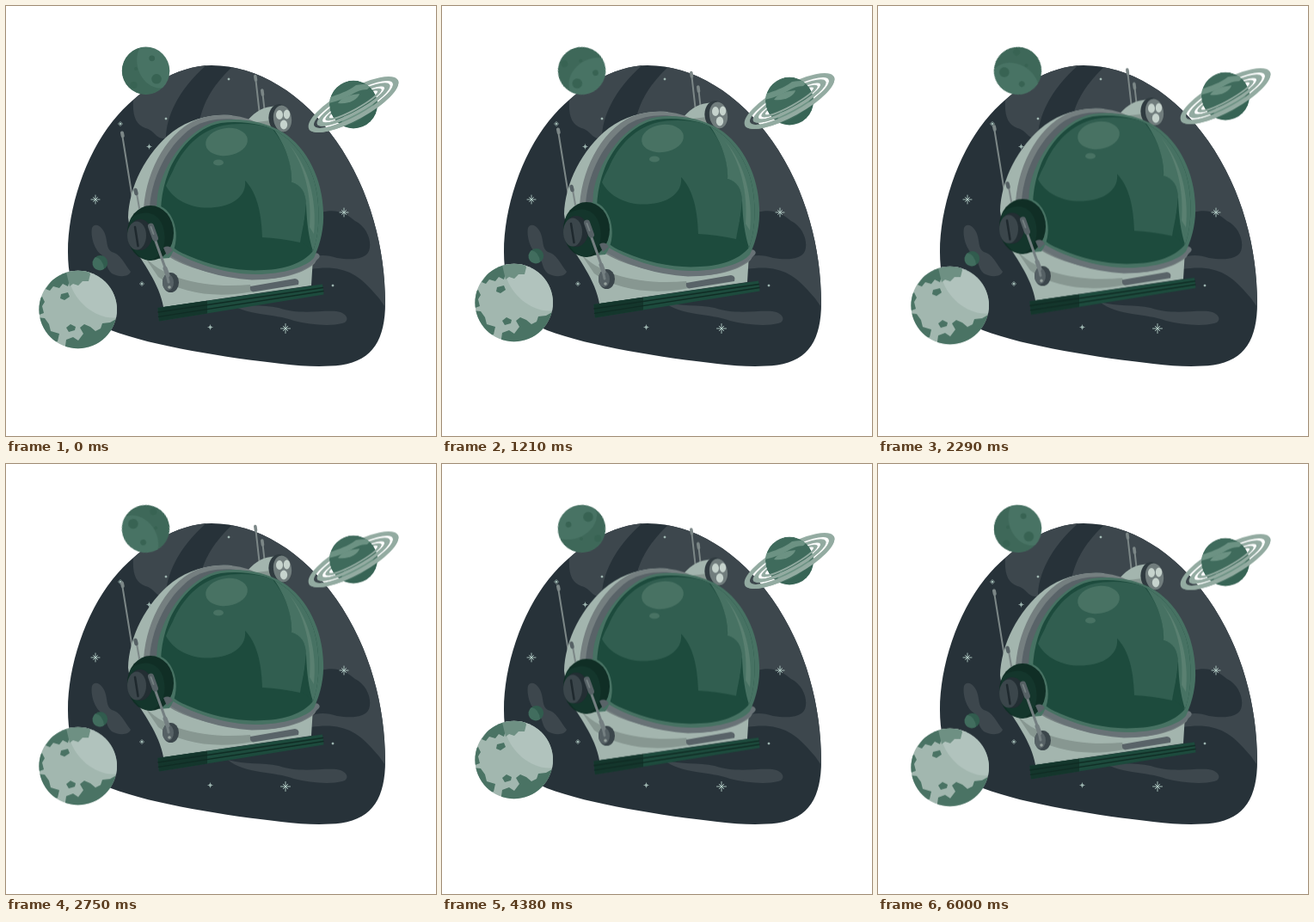
An HTML page that plays this animation: 500 by 500 pixels, repeating every 6040 ms.

```html
<!DOCTYPE html>
<html lang="en">
<head>
<meta charset="utf-8">
<title>Space helmet</title>
<style>
  html, body { margin: 0; width: 100%; height: 100%; overflow: hidden; background: #fff; }
  svg { display: block; width: 100vw; height: 100vh; }
  .float { animation: rise var(--half) linear infinite alternate; }
  .helmet { --half: 3020ms; }
  .globe { --half: 1510ms; }
  .ringed { --half: 755ms; }
  .spin { transform-origin: 162.5px 75.3px; animation: turn 6040ms linear infinite; }
  @keyframes rise { to { transform: translateY(-10px); } }
  @keyframes turn { to { transform: rotate(360deg); } }
  .line { fill: none; stroke-linecap: round; stroke-linejoin: round; }
</style>
</head>
<body>
<svg viewBox="0 0 500 500">
  <defs>
    <clipPath id="skyClip"><path id="sky" d="M239 69C199 69 154 97 124 134C92 174 72 235 72 286C72 334 90 364 122 377C172 396 258 409 320 416C346 419 368 420 390 417.500C427 412 441 387 441 345C441 283 424 214 384 157C346 102 292 69 239 69Z"/></clipPath>
    <clipPath id="globeClip"><circle cx="83.700" cy="353" r="45.300"/></clipPath>
    <clipPath id="moonClip"><circle cx="162.500" cy="75.300" r="27.800"/></clipPath>
    <clipPath id="ballClip"><circle cx="404" cy="114.500" r="28"/></clipPath>
    <clipPath id="visorClip"><path id="visor" d="M250 136C221 141 199 168 189 193C180 216 178 242 182 260C185 277 197 284 211 290C241 303 271 309 300 307C324 306 344 300 357 285C366 262 366 220 355 194C344 166 322 145 298 139C282 135 265 134 250 136Z"/></clipPath>
    <clipPath id="railLeft"><rect x="170" y="320" width="64" height="50"/></clipPath>
    <clipPath id="front"><rect x="-65" y="0" width="130" height="30"/></clipPath>
    <path id="rings" fill-rule="evenodd" d="M-59 0A59 18 0 0 1 59 0A59 18 0 0 1 -59 0ZM-52 0A52 13 0 0 0 52 0A52 13 0 0 0 -52 0ZM-48 0A48 11.500 0 0 1 48 0A48 11.500 0 0 1 -48 0ZM-41 0A41 8 0 0 0 41 0A41 8 0 0 0 -41 0ZM-37 0A37 7 0 0 1 37 0A37 7 0 0 1 -37 0ZM-32 0A32 5 0 0 0 32 0A32 5 0 0 0 -32 0Z"/>
  </defs>

  <!-- sky -->
  <use href="#sky" fill="#273239"/>
  <g clip-path="url(#skyClip)" fill="#3d474d">
    <path d="M148 110C147 128 151 138 162 142C174 145 173 155 186 154C186 128 201 96 236 66L180 70Z"/>
    <path d="M266 68C242 90 230 110 225 134L300 250L366 240C386 235 396 242 406 250C420 257 426 274 422 285C417 296 399 295 385 293C373 289 362 289 355 293L354 306C391 300 409 312 425 330Q435 340 442 352L460 300L430 120Z"/>
    <path d="M100 258C104 250 114 258 116 268C118 276 117 282 123 286C133 288 137 299 145 309C142 316 130 315 123 311C115 304 118 295 111 289C103 284 98 268 100 258Z"/>
    <path d="M258 344C278 350 298 347 317 351C339 359 364 354 384 355C398 357 400 367 391 369C375 373 352 370 335 366C312 357 278 361 258 344Z"/>
  </g>
  <g id="stars" class="line" stroke="#b5cec8"></g>

  <!-- turning moon -->
  <g class="spin">
    <g clip-path="url(#moonClip)">
      <circle cx="162.500" cy="75.300" r="28" fill="#3e6859"/>
      <path d="M158 44C148 58 151 80 166 91Q176 98 187 94L200 70L180 40Z" fill="#487364"/>
      <g fill="#386353">
        <circle cx="175" cy="84.800" r="5.800"/>
        <circle cx="169.700" cy="60.800" r="3.400"/>
        <circle cx="148.500" cy="92" r="4"/>
        <circle cx="151" cy="73" r="2"/>
      </g>
    </g>
  </g>

  <!-- ringed planet -->
  <g class="float ringed">
    <use href="#rings" transform="translate(404 114.500) rotate(-28.800)" fill="#93aba1"/>
    <g clip-path="url(#ballClip)">
      <circle cx="404" cy="114.500" r="28" fill="#3f6b5c"/>
      <g fill="#6c9283">
        <path d="M374 107C386 103 396 100 407 92Q418 90 425 92L420 97C405 97 399 109 374 113Z"/>
        <path d="M386 113C391 105 402 103 411 102C410 108 398 115 386 113Z"/>
        <path d="M393 128C407 126 416 113 434 109L434 115C418 118 412 134 390 136Z"/>
      </g>
      <path d="M432 96C430 120 416 135 392 140L408 148L438 132Z" fill="#315e4f" opacity=".5"/>
    </g>
    <use href="#rings" transform="translate(404 114.500) rotate(-28.800)" fill="#93aba1" clip-path="url(#front)"/>
  </g>

  <!-- helmet -->
  <g class="float helmet">
    <g class="line" stroke="#7c8787">
      <path d="M135 149L149 236" stroke-width="2"/>
      <path d="M135 147.500L135.700 151" stroke-width="4"/>
      <path d="M290 82L294.500 122M298 98L300.500 120" stroke-width="2"/>
      <path d="M289.800 81.500L290.500 86M297.800 98L298.500 103" stroke-width="3.600"/>
    </g>
    <path d="M279 135C287 126 296 118 308 117L322 115L322 147L306 145Z" fill="#a3b5ae"/>
    <path d="M283 136L308 133L312 146L300 145Z" fill="#879791"/>
    <ellipse cx="318.500" cy="131" rx="13" ry="17" transform="rotate(-8 318.500 131)" fill="#303b40"/>
    <ellipse cx="321.500" cy="131" rx="10.500" ry="15.500" transform="rotate(-8 321.500 131)" fill="#717d7d"/>
    <g fill="#c6d3cd">
      <ellipse cx="318" cy="126.500" rx="4" ry="5.400"/>
      <ellipse cx="326.500" cy="126" rx="3.700" ry="5.400"/>
      <ellipse cx="323" cy="138" rx="4.200" ry="5.400"/>
    </g>

    <path d="M142 246C143 211 162 171 194 146C214 131 239 125 262 127L320 170L357 292L355 325L183 350C179 324 158 296 147 279Z" fill="#a3b5ae"/>
    <path d="M160 290C182 317 232 329 284 324L287 332C247 340 204 335 177 315Z" fill="#879791"/>
    <path d="M284 326L336 317Q342 318 340 324L287 332.500Q283 331 284 326Z" fill="#596368"/>
    <path d="M160 249C158 208 178 157 214 136C236 124 268 124 290 135L357 282C361 289 363 297 357 301C339 315 304 321 270 316C238 312 203 302 184 288Z" fill="#757f80"/>
    <path d="M167 250C164 210 184 164 217 141C239 128 270 129 291 138L355 288C348 305 317 314 282 313C247 310 209 299 188 283Z" fill="#596368"/>
    <path d="M185 282C213 303 253 313 286 315C323 315 349 305 361 291" class="line" stroke="#687276" stroke-width="7"/>
    <path d="M250 133C214 139 182 183 176 221C173 250 178 274 194 285C221 301 259 312 291 312C322 312 350 303 358 293C366 276 370 257 369 239C368 203 351 165 322 147C301 134 273 130 250 133Z" fill="#477263"/>
    <use href="#visor" fill="#1d4b3d"/>
    <g clip-path="url(#visorClip)">
      <path d="M186 209C196 228 220 237 243 234C266 232 280 219 278 203C290 215 297 236 298 269Q319 270 342 275C344 260 349 246 349 229C348 213 341 207 332 205C333 182 325 162 309 142C290 136 266 136 252 139C225 145 205 166 194 192Q189 201 186 209Z" fill="#315e50"/>
      <path d="M309 140C327 164 333 188 332 205C343 208 349 216 349 233C348 250 349 271 357 287L376 250L360 170L325 135Z" fill="#477263"/>
      <path d="M349 230Q346 258 343 274L357 285Q350 264 349 230Z" fill="#1d4b3d"/>
      <path d="M329 161C347 184 356 222 353 257L358 265C362 227 352 187 329 161Z" fill="#5a8071"/>
    </g>
    <ellipse cx="256.500" cy="158" rx="24.500" ry="16" transform="rotate(-8 256.500 158)" fill="#487263"/>
    <ellipse cx="247" cy="182" rx="6" ry="3.600" fill="#487263"/>

    <!-- earpiece and boom -->
    <path d="M180 233C198 241 204 274 190 293L178 294L170 232Z" fill="#477263"/>
    <ellipse cx="168" cy="264" rx="27" ry="32" fill="#102e25"/>
    <path d="M145 247C159 236 176 239 182 255C189 276 181 291 168 296C148 294 139 270 145 247Z" fill="#14362c"/>
    <ellipse cx="156" cy="266" rx="14" ry="18" fill="#232e33"/>
    <ellipse cx="152" cy="267" rx="11" ry="16.500" fill="#3b464b"/>
    <path d="M150 257L153.500 279" class="line" stroke="#1f292e" stroke-width="2.500"/>
    <g class="line" stroke="#7c8787">
      <path d="M152 218L155 235" stroke-width="2"/>
      <path d="M150.500 214L151.500 218" stroke="#566165" stroke-width="4.500"/>
    </g>
    <path d="M183 281Q190 277 194 284L187 290Z" fill="#596368"/>
    <ellipse cx="191.500" cy="321.500" rx="9.500" ry="11.500" fill="#3b464b"/>
    <ellipse cx="188.500" cy="321.500" rx="6.500" ry="9.500" fill="#566165"/>
    <g class="line" stroke="#747f81">
      <path d="M172 268L186 307L189 321" stroke-width="3"/>
      <path d="M168.500 256L173.500 270" stroke="#566165" stroke-width="7"/>
      <path d="M168.500 257L171.500 265" stroke-width="2"/>
      <path d="M185 305L188 313" stroke-width="5"/>
    </g>
    <circle cx="190" cy="327" r="1.800" fill="#97a39f"/>

    <!-- neck rail -->
    <path id="rail" d="M176.500 351L368 323.500L369.500 335.500L178 366.500Z" fill="#1d4b3d"/>
    <path d="M176.500 351L234 342.700L234 357.400L178 366.500Z" fill="#14362c"/>
    <path d="M177 356L368.500 327.500M177.500 361.300L369 331.500" class="line" stroke="#102c24" stroke-width="1.300"/>
  </g>

  <!-- globe and its moon -->
  <g class="float globe">
    <circle cx="109.700" cy="298.500" r="8.500" fill="#315c4e"/>
    <path d="M104 292Q113 294 114 305.800A8.500 8.500 0 0 1 104 292Z" fill="#416d5e"/>
    <g clip-path="url(#globeClip)">
      <circle cx="83.700" cy="353" r="46" fill="#a2b7af"/>
      <path d="M72 305C71 327 86 350 108 359Q119 364 132 362L140 310Z" fill="#b1c3bd"/>
      <g fill="#4a7364">
        <path d="M54 318L70 308L74 319L72 326L66 323L62 328L55 326L51 331L46 329Z"/>
        <path d="M64 335L72 333L74 338L68 342L63 340Z"/>
        <path d="M36 341L42 338L45 344L42 349L44 357L36 360Z"/>
        <path d="M36 362L45 363L50 370L52 378L62 381L60 390L48 392Z"/>
        <path d="M70 374L75 370L81 373L80 377L73 379Z"/>
        <path d="M68 402L70 388L78 385L84 389L90 381L86 374L91 370L98 373L104 378L110 375L112 369L121 368L130 363L126 388L108 402Z"/>
      </g>
      <path d="M69 305L95 304L98 312L96 320L89 320L84 325L78 323L74 326Z" fill="#6e9083"/>
    </g>
  </g>
</svg>
<script>
  // x, y, ray length
  const stars = [
    [104, 225, 5], [393, 240, 5], [325, 375, 5.500],
    [133, 137, 2.500], [166.500, 163.500, 2.500], [158, 323, 2.500], [237.500, 373.500, 2.500],
    [186, 131, 1.200], [259, 85, 1.200], [380, 325, 1.200]
  ];
  const ray = (x, y, len, angle) => {
    const dx = len * Math.cos(angle), dy = len * Math.sin(angle);
    return `M${x - dx} ${y - dy}L${x + dx} ${y + dy}`;
  };
  document.getElementById("stars").innerHTML = stars.map(([x, y, r]) => {
    const d = [0, 1, 2, 3].map(i => ray(x, y, i % 2 ? r * 0.7 : r, i * Math.PI / 4)).join("");
    return `<path d="${d}" stroke-width="${r > 4 ? 0.9 : 0.7}"/>`;
  }).join("");
</script>
</body>
</html>
```
